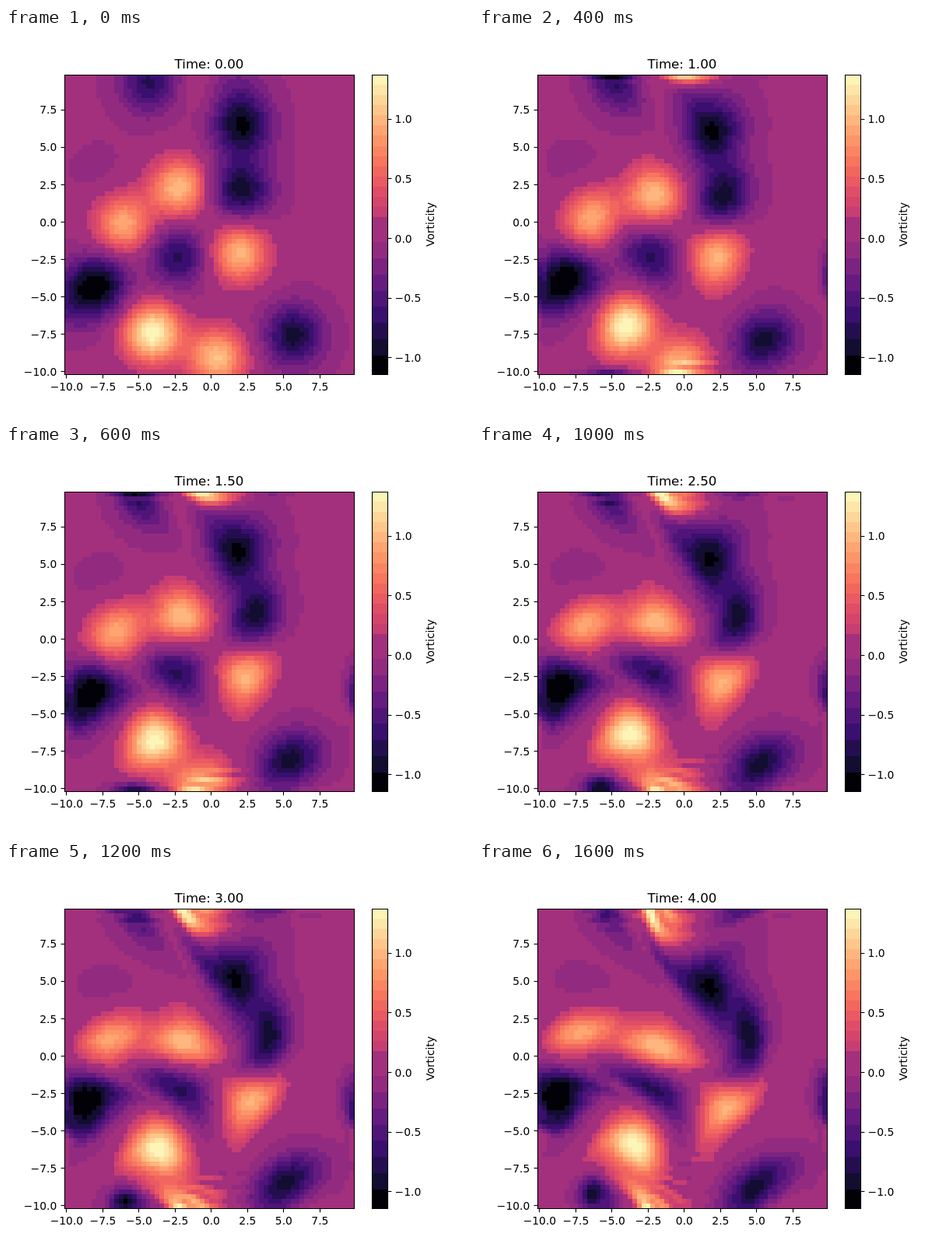
Animation, 600 px wide and 500 px high, one loop 1800 ms. Source, as an HTML page with a canvas:

```html
<!DOCTYPE html>
<html lang="en">
<head>
<meta charset="utf-8">
<title>Vorticity</title>
<style>
  html, body { margin: 0; width: 100%; height: 100%; overflow: hidden; background: #fff; }
  canvas, svg { position: absolute; left: 0; top: 0; display: block; }
  text { font-family: "DejaVu Sans", sans-serif; font-size: 13.89px; fill: #000; }
  path { fill: none; stroke: #000; stroke-width: 1.11; }
</style>
</head>
<body>
<canvas id="field" width="600" height="500"></canvas>
<svg id="axes" width="600" height="500" viewBox="0 0 600 500">
  <text id="title" x="261" y="52" text-anchor="middle" style="font-size:16.67px"></text>
  <text transform="translate(550 252.5) rotate(-90)" text-anchor="middle">Vorticity</text>
</svg>
<script>
const N = 64, SIZE = 20, DX = SIZE / N, CELLS = N * N;
const LEFT = 75, TOP = 60, WIDTH = 372, HEIGHT = 385, BOTTOM = TOP + HEIGHT;
const LOW = -1.138, HIGH = 1.373;
const FRAMES = 9, FRAME_MS = 200, GAP = 0.5, DT = 0.05, NU = 0.001;

// x, y, strength of each Gaussian vortex
const VORTICES = [
  [-4.25, 9.3, -0.75], [2.1, 6.35, -0.98], [1.7, 9, -0.3], [2.07, 2.12, -0.95],
  [-2.24, 2.27, 1.03], [-2.3, -2.25, -0.77], [-6.1, -0.15, 0.93], [1.93, -2.05, 1],
  [-7.7, -4.1, -1], [-9.6, -5.2, -0.5], [-4.08, -7.4, 1.37], [0.4, -9.07, 1.05],
  [5.7, -7.57, -0.92], [-7.9, 3.35, -0.07], [-1, 9, 0.14]
];

const MAGMA = [
  [0, 0, 4], [20, 14, 54], [59, 15, 112], [100, 26, 128], [140, 41, 129], [183, 55, 121],
  [222, 73, 104], [247, 112, 92], [254, 159, 109], [254, 207, 146], [252, 253, 191]
];

// ---- periodic Poisson solver ----
const COS = [], SIN = [], REV = [];
for (let i = 0; i < N; i++) {
  COS.push(Math.cos(2 * Math.PI * i / N));
  SIN.push(-Math.sin(2 * Math.PI * i / N));
  let r = 0;
  for (let b = 1; b < N; b *= 2) r = r * 2 + (i & b ? 1 : 0);
  REV.push(r);
}
const lineRe = new Float64Array(N), lineIm = new Float64Array(N);

function fftLine(re, im, start, step) {
  for (let i = 0; i < N; i++) {
    lineRe[i] = re[start + REV[i] * step];
    lineIm[i] = im[start + REV[i] * step];
  }
  for (let half = 1; half < N; half *= 2) {
    const turn = N / (2 * half);
    for (let base = 0; base < N; base += 2 * half) {
      for (let j = 0; j < half; j++) {
        const a = base + j, b = a + half, c = COS[j * turn], s = SIN[j * turn];
        const x = lineRe[b] * c - lineIm[b] * s, y = lineRe[b] * s + lineIm[b] * c;
        lineRe[b] = lineRe[a] - x; lineIm[b] = lineIm[a] - y;
        lineRe[a] += x; lineIm[a] += y;
      }
    }
  }
  for (let i = 0; i < N; i++) {
    re[start + i * step] = lineRe[i];
    im[start + i * step] = lineIm[i];
  }
}

function fft(re, im) {
  for (let i = 0; i < N; i++) fftLine(re, im, i * N, 1);
  for (let i = 0; i < N; i++) fftLine(re, im, i, N);
}

const wave = i => 2 * Math.PI / SIZE * (i < N / 2 ? i : i - N);

function streamFunction(w) {
  const re = Float64Array.from(w), im = new Float64Array(CELLS);
  fft(re, im);
  for (let j = 0; j < N; j++) {
    for (let i = 0; i < N; i++) {
      const k2 = wave(i) ** 2 + wave(j) ** 2, n = j * N + i;
      const f = k2 ? -1 / (k2 * CELLS) : 0;
      re[n] *= f; im[n] *= f;
    }
  }
  fft(im, re);   // swapped parts give the inverse
  return re;
}

// ---- vorticity transport ----
function rate(w) {
  const psi = streamFunction(w), out = new Float64Array(CELLS);
  for (let j = 0; j < N; j++) {
    const up = (j + 1) % N * N, down = (j + N - 1) % N * N;
    for (let i = 0; i < N; i++) {
      const n = j * N + i;
      const e = j * N + (i + 1) % N, o = j * N + (i + N - 1) % N, u = up + i, d = down + i;
      const vx = (psi[u] - psi[d]) / (2 * DX), vy = (psi[o] - psi[e]) / (2 * DX);
      out[n] = -vx * (w[e] - w[o]) / (2 * DX) - vy * (w[u] - w[d]) / (2 * DX)
        + NU * (w[e] + w[o] + w[u] + w[d] - 4 * w[n]) / (DX * DX);
    }
  }
  return out;
}

const add = (w, k, f) => w.map((v, n) => v + f * k[n]);

function step(w) {
  const a = rate(w), b = rate(add(w, a, DT / 2)), c = rate(add(w, b, DT / 2)), d = rate(add(w, c, DT));
  return w.map((v, n) => v + DT / 6 * (a[n] + 2 * b[n] + 2 * c[n] + d[n]));
}

function simulate() {
  let w = new Float64Array(CELLS);
  for (let n = 0; n < CELLS; n++) {
    const x = -SIZE / 2 + n % N * DX, y = -SIZE / 2 + Math.floor(n / N) * DX;
    for (const [cx, cy, s] of VORTICES) w[n] += s * Math.exp(-((x - cx) ** 2 + (y - cy) ** 2) / 4);
  }
  const list = [w];
  while (list.length < FRAMES) {
    for (let i = 0; i < Math.round(GAP / DT); i++) w = step(w);
    list.push(w);
  }
  return list;
}

// ---- colours ----
const valueAt = y => LOW + (BOTTOM - y) / HEIGHT * (HIGH - LOW);
const yAt = v => BOTTOM - (v - LOW) / (HIGH - LOW) * HEIGHT;

function magma(v) {
  const t = (v - LOW) / (HIGH - LOW) * 10, i = Math.min(9, Math.floor(t));
  return "rgb(" + MAGMA[i].map((c, n) => Math.round(c + (MAGMA[i + 1][n] - c) * (t - i))).join(",") + ")";
}

const edges = [445, 421, 400, 379, 358, 338, 317, 296, 274.5];
for (let i = 0; i <= 14; i++) edges.push(243 - i * 183 / 14);
const bands = edges.slice(1).map((top, i) => {
  const low = valueAt(edges[i]), high = valueAt(top);
  const v = i === 0 ? LOW + 0.02 : low < 0 && high > 0 ? 0 : (low + high) / 2;
  return { high, top, bottom: edges[i], color: magma(v) };
});
const colorOf = v => (bands.find(b => v < b.high) || bands[bands.length - 1]).color;

// ---- drawing ----
const ctx = document.getElementById("field").getContext("2d");
const svg = document.getElementById("axes"), title = document.getElementById("title");
const colX = i => Math.round(LEFT + i * WIDTH / N);
const rowY = j => Math.round(BOTTOM - j * HEIGHT / N);

function drawField(w) {
  for (let j = 0; j < N; j++) {
    for (let i = 0; i < N; i++) {
      ctx.fillStyle = colorOf(w[j * N + i]);
      ctx.fillRect(colX(i), rowY(j + 1), colX(i + 1) - colX(i), rowY(j) - rowY(j + 1));
    }
  }
}

function drawBar() {
  for (const b of bands) {
    const top = Math.round(b.top);
    ctx.fillStyle = b.color;
    ctx.fillRect(470, top, 20, Math.round(b.bottom) - top);
  }
}

function node(name, attrs, content = "") {
  const el = document.createElementNS("http://www.w3.org/2000/svg", name);
  for (const key in attrs) el.setAttribute(key, attrs[key]);
  el.textContent = content;
  svg.append(el);
}

const line = d => node("path", { d });
const label = (v, x, y, anchor) =>
  node("text", { x, y, "text-anchor": anchor }, v.toFixed(1).replace("-", "\u2212"));
const snap = v => Math.floor(v) + 0.5;

function drawAxes() {
  line("M75.5 60.5H447.5V445.5H75.5Z");
  line("M470.5 60.5H490.5V445.5H470.5Z");
  for (let v = -10; v <= 7.5; v += 2.5) {
    const along = (v + SIZE / 2 + DX / 2) / SIZE;
    const x = LEFT + along * WIDTH, y = BOTTOM - along * HEIGHT;
    line(`M${snap(x)} 445.5v4.9`);
    line(`M75.5 ${snap(y)}h-4.9`);
    label(v, x, 465.7, "middle");
    label(v, 65.3, y + 5.2, "end");
  }
  for (let v = -1; v <= 1; v += 0.5) {
    const y = yAt(v);
    line(`M490.5 ${snap(y)}h4.9`);
    label(v, 499.6, y + 5.2, "start");
  }
}

const fields = simulate();
let shown = -1;

function update(now) {
  const n = Math.floor(now / FRAME_MS) % FRAMES;
  if (n !== shown) {
    shown = n;
    drawField(fields[n]);
    title.textContent = "Time: " + (n * GAP).toFixed(2);
  }
}

function loop(now) {
  update(now);
  requestAnimationFrame(loop);
}

drawBar();
drawAxes();
update(0);
requestAnimationFrame(loop);
</script>
</body>
</html>
```
